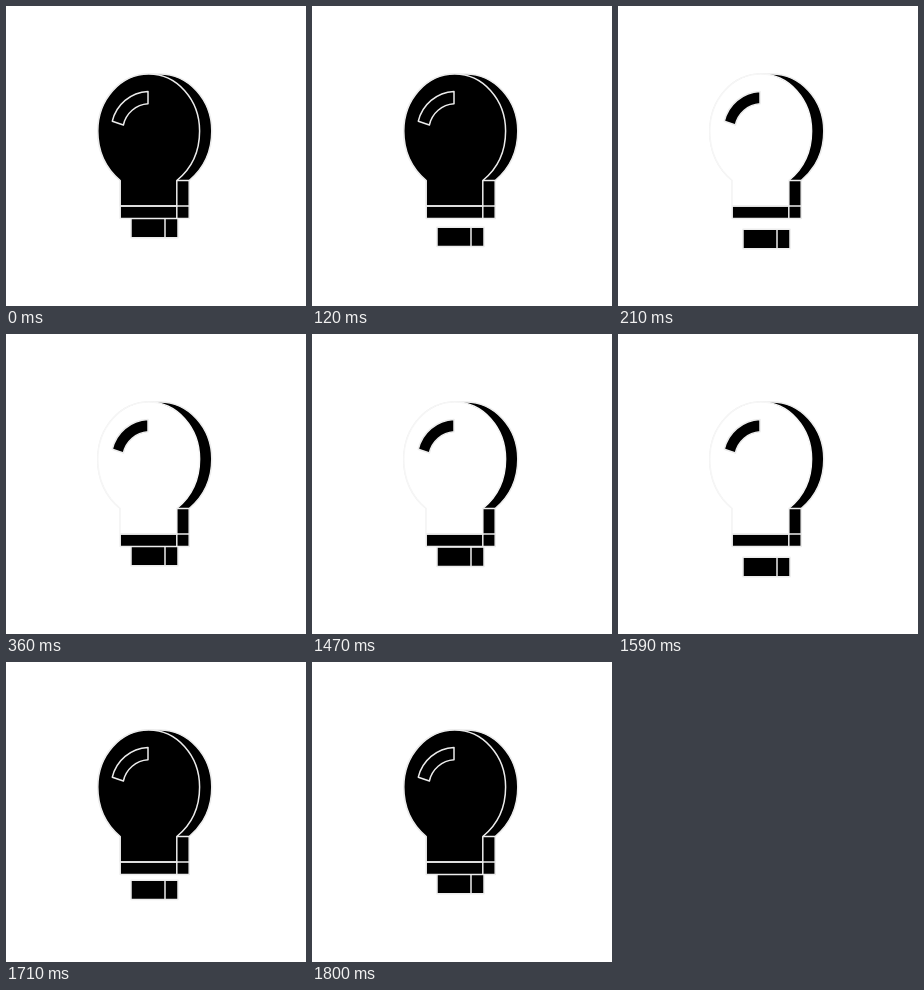
Write an HTML page that moves like this. It is 300x300 px and loops after 1.83 s.

```html
<!DOCTYPE html>
<html lang="en">
<head>
<meta charset="utf-8">
<title>Light bulb</title>
<style>
  html, body { margin: 0; width: 100%; height: 100%; overflow: hidden; background: #fff; }
  svg { display: block; width: 100%; height: 100%; }
</style>
</head>
<body>
<svg viewBox="0 0 300 300" fill="#000" stroke="#ececec" stroke-width="1.5" stroke-linejoin="round">
  <g id="base">
    <rect x="125" y="212.3" width="47" height="19.4"/>
    <path d="M159 212.3V231.7"/>
  </g>
  <!-- extruded body -->
  <path d="M114.2 212.4V174.5C100.5 163 91.8 146 91.8 125A50.9 56.9 0 0 1 142.7 68.1H153.8A52 57 0 0 1 205.8 125C205.8 146 197 163 183.2 174.5V212.4Z"/>
  <!-- glass front -->
  <path id="glass" d="M114.2 199.9V174.5C100.5 163 91.8 146 91.8 125A50.9 56.9 0 0 1 193.6 125C193.6 146 185 163 170.8 174.5V199.9Z"/>
  <path d="M170.8 174.5H183.2M114.2 199.9H183.2M170.8 199.9V212.4" fill="none"/>
  <path d="M142 85.4V97.8A27 27 0 0 0 117.4 119L106.3 115.2A38.5 38.5 0 0 1 142 85.4Z"/>
</svg>
<script>
  const LOOP = 1830, STEP = 30, STEPS = 12, DROP = 11.8;
  const ON_AT = 0, OFF_AT = 1440;
  const base = document.getElementById('base');
  const glass = document.getElementById('glass');

  // progress of one unscrew-and-return move, in whole steps
  const progress = (t, start) =>
    Math.max(0, Math.min(STEPS, Math.floor((t - start) / STEP + 1e-6))) / STEPS;

  const dip = p => DROP * (1 - Math.cos(2 * Math.PI * p)) / 2;

  function draw(t) {
    const on = progress(t, ON_AT), off = progress(t, OFF_AT);
    // the glass flips as the base starts back up
    const lit = on > 0.5 && off <= 0.5;
    base.setAttribute('transform', `translate(0 ${(dip(on) + dip(off)).toFixed(2)})`);
    glass.setAttribute('fill', lit ? '#fff' : '#000');
    glass.setAttribute('stroke', lit ? '#f6f6f6' : '#ececec');
  }

  const begin = performance.now();
  function tick() {
    draw((performance.now() - begin) % LOOP);
    requestAnimationFrame(tick);
  }
  draw(0);
  requestAnimationFrame(tick);
</script>
</body>
</html>
```
